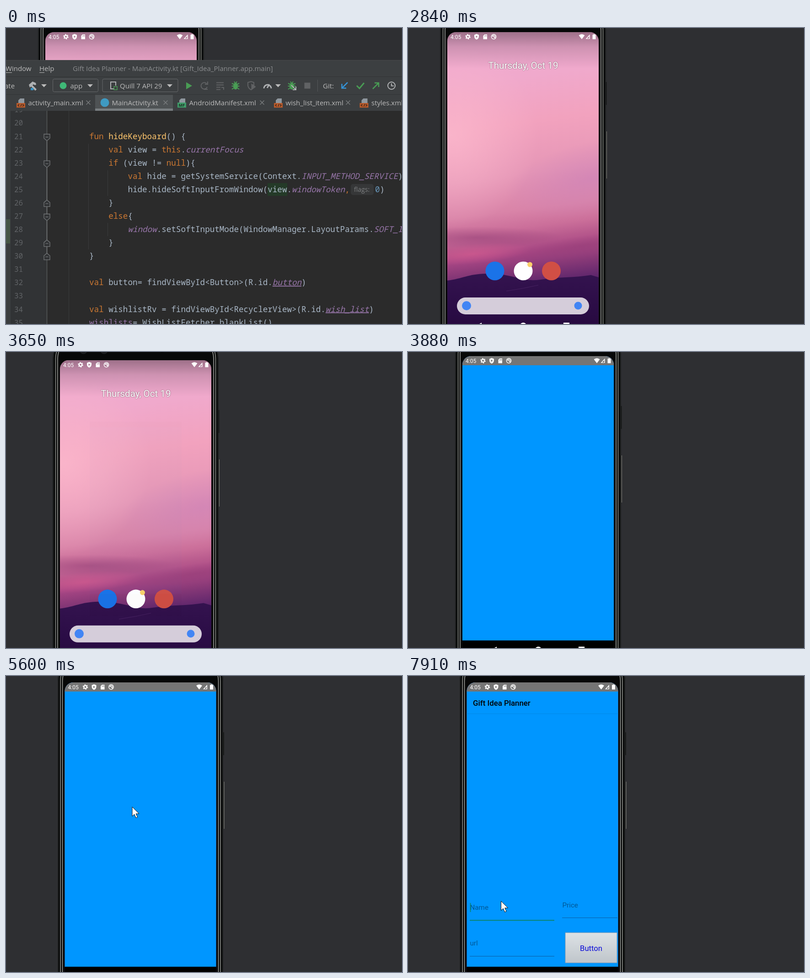
Animation, 866 px wide and 647 px high, one loop 8 s. Source, as an HTML page:

```html
<!DOCTYPE html>
<html lang="en">
<head>
<meta charset="utf-8">
<title>App launch</title>
<style>
html, body { margin: 0; width: 100%; height: 100%; overflow: hidden; background: #2e2f32 }
svg { display: block; width: 866px; height: 647px }
text { white-space: pre }
.ui { font: 15px "Open Sans", "Noto Sans", sans-serif; fill: #bbb }
.code { font: 17.58px "Noto Sans Mono", "DejaVu Sans Mono", monospace; fill: #a9b7c6 }
.num { font-size: 16px; fill: #606366 }
.k { fill: #cc7832 }
.f { fill: #ffc66d }
.n { fill: #6897bb }
.p, .u { fill: #9876aa; font-style: italic }
.u { text-decoration: underline }
.s { fill: #9876aa }
.phone { font-family: Roboto, "Noto Sans", sans-serif }
.line { fill: none; stroke-width: 2 }
.off { fill: #606264; stroke: #606264 }
.go { fill: #499c54; stroke: #499c54 }
</style>
</head>
<body>
<svg viewBox="0 0 866 647">
<defs>
  <linearGradient id="sky" x1="220" y1="9" x2="290" y2="560" gradientUnits="userSpaceOnUse">
    <stop offset="0" stop-color="#efaad0"/>
    <stop offset=".18" stop-color="#f0a9cc"/>
    <stop offset=".36" stop-color="#f2a2be"/>
    <stop offset=".56" stop-color="#e596b6"/>
    <stop offset=".7" stop-color="#d984a8"/>
    <stop offset=".77" stop-color="#cb6f9a"/>
    <stop offset=".82" stop-color="#b85a8d"/>
    <stop offset=".87" stop-color="#a94785"/>
    <stop offset=".92" stop-color="#8b3a78"/>
    <stop offset="1" stop-color="#5c256b"/>
  </linearGradient>
  <linearGradient id="shade" x1="0" y1="0" x2="0" y2="1">
    <stop offset="0" stop-opacity=".34"/>
    <stop offset=".4" stop-opacity=".14"/>
    <stop offset="1" stop-opacity="0"/>
  </linearGradient>
  <linearGradient id="hill" x1="0" y1="0" x2="0" y2="1">
    <stop offset="0" stop-color="#34134f"/>
    <stop offset=".5" stop-color="#2a0c45"/>
    <stop offset="1" stop-color="#220632"/>
  </linearGradient>
  <radialGradient id="glow">
    <stop offset="0" stop-color="#fbb7cc" stop-opacity=".85"/>
    <stop offset="1" stop-color="#fbb7cc" stop-opacity="0"/>
  </radialGradient>
  <radialGradient id="mauve">
    <stop offset="0" stop-color="#cd82b8" stop-opacity=".65"/>
    <stop offset="1" stop-color="#cd82b8" stop-opacity="0"/>
  </radialGradient>
  <radialGradient id="dusk">
    <stop offset="0" stop-color="#8f3c74" stop-opacity=".5"/>
    <stop offset="1" stop-color="#8f3c74" stop-opacity="0"/>
  </radialGradient>
  <radialGradient id="rose">
    <stop offset="0" stop-color="#d95c90" stop-opacity=".6"/>
    <stop offset="1" stop-color="#d95c90" stop-opacity="0"/>
  </radialGradient>
  <linearGradient id="key" x1="0" y1="0" x2="0" y2="1">
    <stop offset="0" stop-color="#dde2e6"/>
    <stop offset="1" stop-color="#bfc5ca"/>
  </linearGradient>
  <clipPath id="screen"><rect x="86" y="9" width="331" height="700" rx="19"/></clipPath>
  <clipPath id="editor"><rect y="181" width="866" height="466"/></clipPath>
</defs>
<rect width="866" height="647" fill="#2e2f32"/>

<g id="phone" class="phone">
  <rect x="432" y="118" width="2.500" height="50" fill="#191a1a"/>
  <rect x="432" y="226" width="2" height="103" fill="#191a1a"/>
  <rect x="433.700" y="226" width="1.200" height="103" fill="#85867f"/>
  <rect x="70.500" y="-54" width="362" height="820" rx="60" fill="#070808"/>
  <g fill="none">
    <rect x="71.500" y="-53" width="360" height="818" rx="59" stroke="#1d1f1f" stroke-width="2"/>
    <rect x="76.500" y="-48" width="350" height="808" rx="54" stroke="#747672" stroke-width="2"/>
    <rect x="81" y="-44" width="341" height="800" rx="50" stroke="#9b9d99" stroke-width="1.600"/>
  </g>
  <rect x="82.500" y="-42" width="338" height="796" rx="48" fill="#070808"/>
  <g fill="#18191b" stroke="#25272a">
    <circle cx="137.500" cy="-13" r="8"/><circle cx="182.500" cy="-13" r="8"/>
    <circle cx="309.500" cy="-13" r="5.500" fill="#020203" stroke="none"/>
    <rect x="210" y="-30" width="83" height="9" rx="3" stroke="none"/>
  </g>
  <g fill="#55575a"><circle cx="136" cy="-14" r="2"/><circle cx="181" cy="-14" r="2"/></g>
  <g clip-path="url(#screen)">
    <rect x="86" y="9" width="331" height="700" fill="url(#sky)"/>
    <ellipse cx="95" cy="235" rx="190" ry="200" fill="url(#glow)"/>
    <ellipse cx="400" cy="330" rx="190" ry="80" fill="url(#mauve)" transform="rotate(-12 400 330)"/>
    <ellipse cx="150" cy="458" rx="190" ry="24" fill="url(#dusk)"/>
    <ellipse cx="380" cy="476" rx="200" ry="22" fill="url(#dusk)" transform="rotate(-8 380 476)"/>
    <ellipse cx="140" cy="494" rx="130" ry="22" fill="url(#rose)" transform="rotate(-5 140 494)"/>
    <rect x="86" y="9" width="331" height="80" fill="url(#shade)"/>
    <path d="M86 552C120 548 130 538 170 537C195 535 215 541 240 546Q265 554 290 550T345 545T400 540L417 545V709H86Z" fill="url(#hill)"/>
    <path d="M215 575Q250 570 285 562" fill="none" stroke="#472261"/>
    <text x="252" y="89" text-anchor="middle" font-size="20.600" fill="#fff" style="text-shadow:0 0 2px #000a">Thursday, Oct 19</text>
    <circle cx="190" cy="531" r="20.500" fill="#1a73e8"/>
    <circle cx="252" cy="531" r="20.500" fill="#fff"/>
    <circle cx="266.500" cy="517" r="5.500" fill="#fbd06a"/>
    <circle cx="313.500" cy="531" r="20.500" fill="#d14f45"/>
    <rect x="107" y="589" width="289" height="37" rx="18.500" fill="#d5cdda"/>
    <circle cx="128" cy="607" r="10" fill="#4285f4"/>
    <circle cx="372" cy="607" r="8.500" fill="#4285f4"/>
    <g id="app">
      <g transform="translate(-42.5 -5)">
        <rect x="128" y="14" width="332" height="622" fill="#0096ff"/>
        <rect x="128" y="14" width="332" height="20" fill="#757575"/>
        <rect x="128" y="635.500" width="332" height="80" fill="#000"/>
        <g id="form">
          <path d="M128 82.500H460" stroke="#0089ea"/>
          <text x="142" y="64.500" font-size="16.800" font-weight="500">Gift Idea Planner</text>
          <g font-size="15.200" fill="#000" fill-opacity=".42">
            <text x="135.500" y="511">Name</text>
            <text x="337.500" y="506">Price</text>
            <text x="135.500" y="589">url</text>
          </g>
          <path d="M337 528.500H458M135 612.500H320" stroke="#0a5fa5"/>
          <path id="idle" d="M135 534.500H320" stroke="#0a5fa5"/>
          <path id="focus" d="M135 534H320M136.500 496V516" stroke="#0b8577" stroke-width="1.800"/>
          <rect x="344" y="561" width="113" height="66" fill="url(#key)" stroke="#8398ab"/>
          <text x="400.500" y="600.500" text-anchor="middle" font-size="16.600" fill="#0a0ad8">Button</text>
        </g>
      </g>
    </g>
    <g fill="#fff">
      <text x="93" y="24" font-size="12">4:05</text>
      <circle cx="131" cy="19" r="3.200" fill="none" stroke="#fff" stroke-width="2.200"/>
      <circle cx="131" cy="19" r="5" fill="none" stroke="#fff" stroke-width="1.600" stroke-dasharray="2.6 2.636"/>
      <path fill-rule="evenodd" d="M150 13L155 15V19Q154.500 23.500 150 25.500Q145.500 23.500 145 19V15ZM148.500 16.500V21.500L152.500 19Z"/>
      <path fill-rule="evenodd" d="M167.500 14H173V24.500H164.500V17ZM167 16.500V18.500H168V16.500ZM169 15.500V18.500H170V15.500ZM171 15.500V18.500H172V15.500Z"/>
      <circle cx="187.500" cy="19" r="5.200" fill="none" stroke="#fff" stroke-width="1.400"/>
      <path d="M184.500 19A3 3 0 1 1 189 21.500M185 16.500L191 22.500" fill="none" stroke="#fff" stroke-width="1.400"/>
      <path d="M373.500 16Q380 11 386.500 16L380 24.500Z"/>
      <path d="M397.500 14V24H388.500ZM396 18L391.500 23H396Z" fill-rule="evenodd"/>
      <path d="M403.500 14.500H405.500V13.500H408.500V14.500H410.500V24.500H403.500Z"/>
      <path d="M161 644V659L148.500 651.500Z"/>
      <circle cx="252" cy="651.500" r="7.500"/>
      <rect x="340" y="644" width="13" height="13"/>
    </g>
  </g>
</g>

<g id="ide">
  <rect y="70" width="866" height="111" fill="#3c3f41"/>
  <path d="M0 106.500H866M0 145.500H866" stroke="#323435"/>
  <path d="M0 70.500H866" stroke="#47494b"/>
  <rect x="195" y="146" width="170" height="35" fill="#4e5254"/>
  <rect id="underline" x="195" y="176" width="170" height="5"/>
  <g id="bar" class="ui"></g>
  <rect y="181" width="866" height="466" fill="#2b2b2b"/>
  <rect y="181" width="89" height="466" fill="#313335"/>
  <rect y="181" width="10" height="466" fill="#3a3d3f"/>
  <rect y="418" width="9" height="53" fill="#455545"/>
  <path d="M137.500 181V647M180.500 253V484M222.500 311V367M222.500 426V455" stroke="#3a3b3c"/>
  <path d="M89.500 181V647" stroke="#55585a" stroke-width="1.500"/>
  <path d="M89.500 239V498" stroke="#737678" stroke-width="1.500"/>
  <rect x="572" y="339" width="43" height="28" fill="#243a28"/>
  <rect x="754" y="341" width="50" height="24" rx="5" fill="#363738"/>
  <text class="ui" x="761" y="358" style="font-size:14px;fill:#7d7f80">flags:</text>
  <g id="folds"></g>
  <g id="code" class="code" clip-path="url(#editor)"></g>
</g>

<path id="cursor" d="M0 0V20.500L4.700 16.200 8.200 24 11.600 22.500 8.200 15H15Z" fill="#fff" stroke="#111" stroke-linejoin="round"/>
</svg>

<script>
const $ = id => document.getElementById(id);
const text = (x, y, s, extra = '') => `<text x="${x}" y="${y}" ${extra}>${s}</text>`;
const path = (cls, d, extra = '') => `<path class="${cls}" d="${d}" ${extra}/>`;
const caret = (x, y = 123) => path('', `M${x - 6} ${y}h12l-6 6.500Z`);

// Toolbar and tabs
const bug = x => `<g class="go"><ellipse cx="${x}" cy="127" rx="5" ry="7.500" stroke="none"/>` +
  path('line', `M${x - 8} 121l4 2M${x + 8} 121l-4 2M${x - 8.500} 127h17M${x - 8} 134l4-3M${x + 8} 134l-4-3M${x - 3} 117l2 3M${x + 3} 117l-2 3`) + '</g>';
const sheet = x => path('', `M${x - 2} 154h9v13h-13v-9Z`, 'fill="#8f979e"');
const xmlIcon = x => sheet(x) + `<rect x="${x - 10}" y="164" width="19" height="10" fill="#b85a2b"/>` +
  path('', `M${x - 4} 166.500l-3 2.500 3 2.500M${x + 3} 166.500l3 2.500-3 2.500M${x + 1} 166l-2 6`, 'fill="none" stroke="#33241c" stroke-width="1.300"');
const mfIcon = x => sheet(x) + `<rect x="${x - 10}" y="163" width="19" height="11" fill="#3f9a68"/>` +
  text(x - 7.500, 172, 'MF', 'style="font-size:9px;font-weight:700;fill:#1d3327"');
const classIcon = x => `<circle cx="${x}" cy="163" r="9.500" fill="#3f9ac2"/>`;
const tab = (x, icon, name, close) => icon(x) + text(x + 15.500, 168.500, name) +
  path('', `M${close - 4.500} 158.500l9 9m0-9l-9 9`, 'stroke="#7d8082" stroke-width="1.300"');

$('bar').innerHTML =
  text(-1, 94, 'Window') + text(73, 94, 'Help') +
  path('', 'M0 97.500H13M73 97.500H84', 'stroke="#bbb"') +
  text(146, 94, 'Gift Idea Planner - MainActivity.kt [Gift_Idea_Planner.app.main]', 'style="fill:#8b8d8f"') +
  text(-3, 131.500, 'ate') +
  `<g id="hammer">${path('', 'M50 124l8-7 7 3 1 4-3 1-3-2-2 2 9 9-3 3-9-9-3 2Z')}</g>` +
  '<rect id="spark" x="54" y="131" width="6" height="5" fill="#3592c4"/>' + caret(83) +
  '<g fill="none" stroke="#67696b"><rect x="102.500" y="111.500" width="99" height="28" rx="3"/><rect x="211" y="111.500" width="165" height="28" rx="3"/></g>' +
  '<circle cx="125" cy="126" r="7.500" fill="#3fb877"/>' +
  text(140.500, 131.500, 'app') + caret(184) +
  path('line', 'M237 133h-8V118h11v8', 'stroke="#afb1b3"') + '<rect x="236" y="128" width="7" height="7" fill="none" stroke="#499c54" stroke-width="1.500"/>' +
  text(249, 131.500, 'Quill 7 API 29') + caret(358) +
  `<g id="run">${path('', 'M394 118.500V134L407 126.200Z')}</g>` +
  '<g class="off">' + path('line', 'M439 122a7 7 0 1 0 1 7M433 134h8M441 117v6h-6') +
  path('line', 'M460 119.500h16M460 124.500h16M460 129.500h9M460 134.500h9M471 130h5v5') +
  path('line', 'M529 119l7-2 6 2v7q-1 6-6 9-6-3-7-9Z') + path('', 'M537 122v13l9-6.500Z') +
  '<rect x="653" y="120" width="12" height="12"/></g>' +
  bug(502) + bug(625) + path('line', 'M624 125l10 10M634 128v7h-7', 'stroke="#afb1b3"') +
  path('line', 'M564 132a8 8 0 0 1 16 0M571 131l5-8', 'stroke="#afb1b3" style="stroke-width:3px"') + caret(595) +
  path('', 'M681.500 113V139', 'stroke="#555759"') + text(693, 131.500, 'Git:') +
  path('line', 'M747 119l-12 12M734.500 122v9.500h9.500', 'stroke="#3592d4" style="stroke-width:2.500px"') +
  path('line', 'M767 126l6 6 10-12', 'stroke="#499c54" style="stroke-width:3px"') +
  path('line', 'M802 133l12-12M806 120h9v9', 'stroke="#499c54" style="stroke-width:2.500px"') +
  '<circle class="line" cx="843" cy="126" r="8" stroke="#afb1b3"/>' + path('line', 'M843 121v5.500h5', 'stroke="#afb1b3"') +
  tab(33, xmlIcon, 'activity_main.xml', 180) + tab(216, classIcon, 'MainActivity.kt', 349) +
  tab(385, mfIcon, 'AndroidManifest.xml', 560) + tab(596, xmlIcon, 'wish_list_item.xml', 748) +
  tab(783.500, xmlIcon, 'styles.xml', 880);

// Editor: "~" starts a token, its first letter is the colour class
const lineY = n => 242.500 + (n - 21) * 29.080;
const lines = {
  21: [0, '~kfun ~fhideKeyboard~t() {'],
  22: [4, '~kval ~tview = ~kthis~t.~pcurrentFocus'],
  23: [4, '~kif ~t(view != ~knull~t){'],
  24: [8, '~kval ~thide = getSystemService(Context.~pINPUT_METHOD_SERVICE~t)'],
  25: [8, '~thide.hideSoftInputFromWindow(view.~pwindowToken~k,'],
  26: [4, '~t}'],
  27: [4, '~kelse~t{'],
  28: [8, '~pwindow~t.setSoftInputMode(WindowManager.LayoutParams.~pSOFT_INPUT'],
  29: [4, '~t}'],
  30: [0, '~t}'],
  32: [0, '~kval ~tbutton= findViewById&lt;Button>(R.id.~ubutton~t)'],
  34: [0, '~kval ~twishlistRv = findViewById&lt;RecyclerView>(R.id.~uwish_list~t)'],
  35: [0, '~swishlists~t= WishListFetcher.blankList()']
};
const paint = s => s.split('~').slice(1).map(p => `<tspan class="${p[0]}">${p.slice(1)}</tspan>`).join('');
let code = text(807, lineY(25), '<tspan class="n">0</tspan>)');
for (let n = 19; n < 36; n++) {
  code += text(18, lineY(n), n, 'class="num"');
  if (lines[n]) code += text(182 + lines[n][0] * 10.550, lineY(n), paint(lines[n][1]));
}
$('code').innerHTML = code;

const fold = (n, dir) => `<path transform="translate(89.500 ${lineY(n) - 4}) scale(1 ${dir})" ` +
  'd="M-6.500-6.500H6.500V2.500L0 8-6.500 2.500ZM-3 0H3" fill="#313335" stroke="#737678" stroke-width="1.300"/>';
$('folds').innerHTML = [21, 23, 27].map(n => fold(n, 1)).join('') + [26, 29, 30].map(n => fold(n, -1)).join('');

// Motion: keys are [time, x, y]
const phoneKeys = [[3220, 0, 0], [3290, 43, 23.500], [3490, 43, 23.500], [3500, 40.500, 23.500], [3570, 40.500, 23.500],
  [3700, 28, 2], [3880, 33, 0], [3940, 33, 0], [4120, 42.500, 5]];
const cursorKeys = [[230, 660, 528], [550, 400, 116], [780, 400, 116], [850, 440, 34], [1110, 440, 34],
  [1300, 446, 12], [1600, 448, 27], [1940, 448, 27], [2030, 452, 27], [2300, 453, 28], [2360, 461, 32],
  [2770, 461, 32], [2840, 375.500, -46]];
const handKeys = [[4610, 418, -41], [4680, 398, -3], [5390, 282, 257], [5420, 282, 257], [5600, 276, 286],
  [6190, 276, 286], [6940, 231, 530], [7010, 231, 530], [7130, 205, 530], [7360, 205, 530], [7450, 203.500, 492]];

const ramp = (t, a, b) => {
  const p = Math.min(1, Math.max(0, (t - a) / (b - a)));
  return p * p * (3 - 2 * p);
};
const at = (keys, t) => {
  let [, x, y] = keys[0];
  for (let i = 1; i < keys.length && t > keys[i - 1][0]; i++) {
    const [t0, x0, y0] = keys[i - 1], [t1, x1, y1] = keys[i], p = ramp(t, t0, t1);
    x = x0 + (x1 - x0) * p;
    y = y0 + (y1 - y0) * p;
  }
  return [x, y];
};
const move = (id, [x, y]) => $(id).setAttribute('transform', `translate(${x} ${y})`);
const show = (id, alpha) => {
  $(id).style.opacity = alpha;
  $(id).style.display = alpha > 0 ? '' : 'none';
};

function draw() {
  const t = performance.now() % 8000;

  const building = t >= 780;
  $('underline').style.fill = building ? '#4a88c7' : '#787d80';
  $('hammer').style.fill = building ? '#606264' : '#afb1b3';
  $('run').style.fill = building ? '#606264' : '#499c54';
  show('spark', building ? 0 : 1);

  const gone = ramp(t, 1690, 1790), size = 1 - .12 * gone;
  show('ide', 1 - gone);
  $('ide').setAttribute('transform', `translate(433 647) scale(${size}) translate(-433 -647)`);

  const phone = at(phoneKeys, t);
  move('phone', phone);
  const open = ramp(t, 3640, 3800), zoom = .6 + .4 * open;
  show('app', open);
  $('app').setAttribute('transform', `translate(251.500 350) scale(${zoom}) translate(-251.500 -350)`);
  show('form', ramp(t, 6190, 6340));
  show('idle', t < 7720 ? 1 : 0);
  show('focus', t < 7720 ? 0 : 1);

  show('cursor', t < 230 ? 0 : 1);
  move('cursor', t < 2840 ? at(cursorKeys, t) : t < 4610 ? [phone[0] + 375.500, phone[1] - 46] : at(handKeys, t));
  requestAnimationFrame(draw);
}
draw();
</script>
</body>
</html>
```
